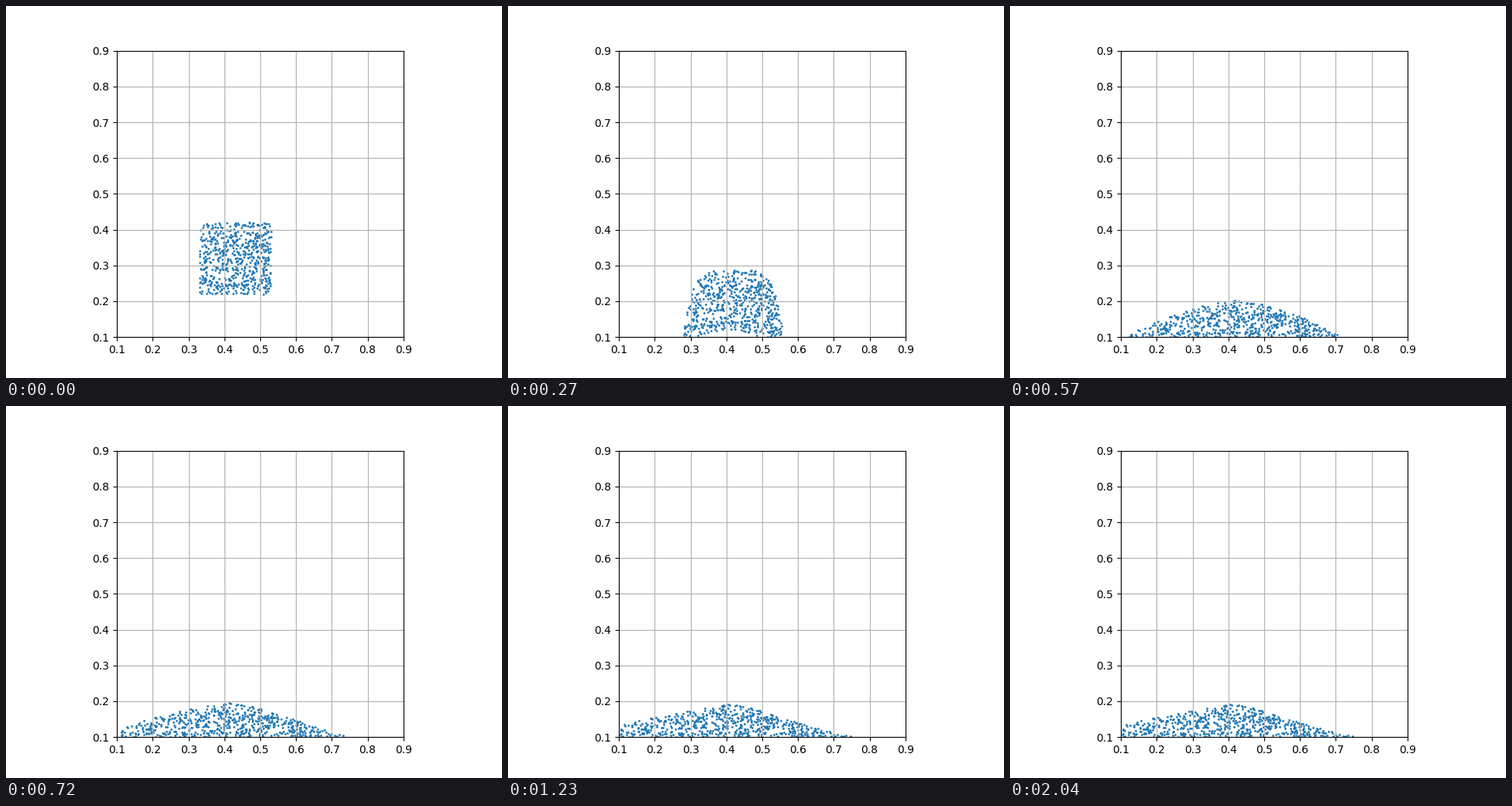
Animation, 640 px wide and 480 px high, one loop 2100 ms. Source, as a matplotlib script:

```python
import numpy as np
import matplotlib.pyplot as plt
from matplotlib.animation import FuncAnimation

FRAMES, INTERVAL = 70, 30
COUNT = 600
FLOOR, WALL = 0.1, 0.103
SIDE, DROP = 0.2, 0.12
IMPACT, REST = 6.5, 37       # frames at which the block lands and the heap rests
GRAVITY = 2 * DROP / IMPACT ** 2

rng = np.random.default_rng(4)
u, v = rng.random((2, COUNT))


def hill(left, peak, right, height, p, q=1, lift=0):
    """Spread the grains evenly in a hill whose base is lifted to an arch."""
    x = np.linspace(max(left, WALL), right, 800)
    d = np.abs(x - peak) / np.where(x < peak, peak - left, right - peak)
    top = height * np.maximum(1 - d ** p, 0) ** q
    base = lift * np.maximum(1 - ((x - 0.405) / 0.09) ** 2, 0)
    share = np.cumsum(np.maximum(top - base, 1e-5))
    px = np.interp(u, share / share[-1], x)
    low, high = np.interp(px, x, base), np.interp(px, x, top)
    return np.column_stack([px, FLOOR + low + v * (high - low)])


block = np.column_stack([0.33 + SIDE * u, FLOOR + DROP + SIDE * v])
landed = block - [0, DROP]
bulge = hill(0.278, 0.42, 0.558, 0.187, p=5, q=0.8, lift=0.02)
arch = hill(0.178, 0.425, 0.64, 0.155, p=1.8, lift=0.053)
mound = hill(0.105, 0.42, 0.72, 0.102, p=1.6)
heap = hill(-0.18, 0.42, 0.785, 0.094, p=1.2, q=1.5)

times = [IMPACT, 9, 14, 19]
poses = [landed, bulge, arch, mound]


def slope(a, b):
    return (poses[b] - poses[a]) / (times[b] - times[a])


# The top of the block is still falling when its base has stopped.
start = np.column_stack([slope(0, 1)[:, 0], -GRAVITY * IMPACT * v])
slopes = [start, slope(0, 2), slope(1, 3), slope(2, 3)]


def hermite(k, t):
    h = times[k + 1] - times[k]
    s = (t - times[k]) / h
    return ((1 + 2 * s) * (1 - s) ** 2 * poses[k]
            + s * (1 - s) ** 2 * h * slopes[k]
            + s ** 2 * (3 - 2 * s) * poses[k + 1]
            + s ** 2 * (s - 1) * h * slopes[k + 1])


def grains(t):
    if t <= IMPACT:
        return block - [0, GRAVITY * t ** 2 / 2]
    if t < times[-1]:
        k = np.searchsorted(times, t, side="right") - 1
        pos = hermite(k, t)
    else:
        s = min((t - times[-1]) / (REST - times[-1]), 1)
        pos = heap + (mound - heap) * (1 - s) ** 3
    return np.maximum(pos, FLOOR)


fig, ax = plt.subplots(figsize=(6.4, 4.8), dpi=100)
ticks = np.arange(1, 10) / 10
ax.set(aspect="equal", xlim=(0.1, 0.9), ylim=(0.1, 0.9), xticks=ticks, yticks=ticks)
ax.grid(True)
dots = ax.scatter(block[:, 0], block[:, 1], s=1)


def update(frame):
    dots.set_offsets(grains(frame))
    return (dots,)


anim = FuncAnimation(fig, update, frames=FRAMES, interval=INTERVAL, repeat=True,
                     repeat_delay=0)
plt.show()
```
